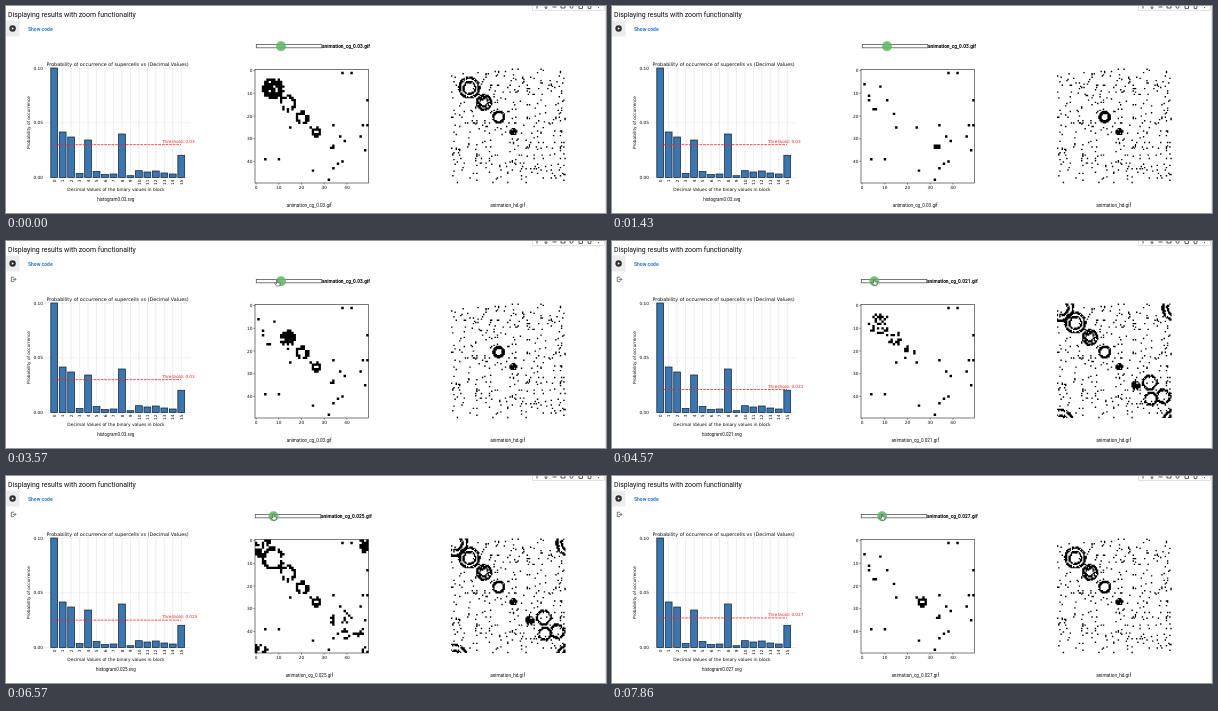
These frames come from a looping animation (600x207 px, 8 s). An HTML page:

```html
<!DOCTYPE html>
<html lang="en">
<head>
<meta charset="utf-8">
<title>Zoom results</title>
<style>
html, body { margin: 0; width: 100%; height: 100%; overflow: hidden; background: #fff; }
svg { display: block; width: 100vw; height: 100vh; }
.ui { font-family: Roboto, Arial, sans-serif; }
.plot { font-family: "DejaVu Sans", Verdana, sans-serif; }
</style>
</head>
<body>
<svg id="stage" viewBox="0 0 600 207"></svg>
<script>
const LOOP = 8000, TICK = 1000 / 7;
const stage = document.getElementById('stage');

function add(tag, attrs, text) {
  const el = document.createElementNS('http://www.w3.org/2000/svg', tag);
  for (const k in attrs) el.setAttribute(k, attrs[k]);
  if (text !== undefined) el.textContent = text;
  stage.appendChild(el);
  return el;
}
const label = (x, y, size, text, more) =>
  add('text', { x, y, 'font-size': size, fill: '#0c0c0c', class: 'ui', ...more }, text);
const plotText = (x, y, size, text, more) => label(x, y, size, text, { class: 'plot', ...more });
const line = (d, stroke, width, more) =>
  add('path', { d, stroke, 'stroke-width': width, fill: 'none', ...more });
const mid = { 'text-anchor': 'middle' };
const end = { 'text-anchor': 'end' };

// Notebook cell
line('M599.6 0V207', '#d8d8d8', 0.8);
label(2, 11, 6.93, 'Displaying results with zoom functionality');
add('rect', { x: 0, y: 14.5, width: 13.5, height: 16, fill: '#ececec' });
add('circle', { cx: 6.6, cy: 22.5, r: 3.2, fill: '#303030' });
add('path', { d: 'M5.8 21.2v2.6l2.2-1.3z', fill: '#fff' });
label(22, 24.8, 5, 'Show code', { fill: '#2f79cf', 'font-weight': 700 });
const outIcon = line('M8 36.2H5.3v4.4H8M6.8 38.4h3M8.4 36.9l1.5 1.5-1.5 1.5', '#444', 0.7);

// Toolbar
add('rect', { x: 526.5, y: -6, width: 72, height: 10.5, fill: '#fff', stroke: '#cfcfcf', 'stroke-width': 0.6 });
line('M531 0v2.6M540 0v2.6l-1.5-1.4M540 2.6l1.5-1.4M546.5 1h4M555 0v2h4V0M573 0v2.4h3.5V0M582 0l.3 2.6h2.4L585 0', '#444', 0.9);
add('circle', { cx: 565.5, cy: 0.7, r: 1.5, fill: 'none', stroke: '#444', 'stroke-width': 0.9 });
add('circle', { cx: 592.5, cy: 1.6, r: 0.6, fill: '#444' });

// Histogram
const BASE = 171.5, yOf = v => BASE - v * 1095;
const tops = [62, 126, 131, 167.5, 134, 165.5, 168.5, 168, 128, 169.7, 164.7, 166, 165, 167, 168, 149.3];
const barX = i => 48.2 + i * 8.47;
plotText(111.5, 59.8, 4.86, 'Probability of occurrence of supercells vs (Decimal Values)', mid);
plotText(0, 0, 4.25, 'Probability of occurrence', { ...mid, transform: 'translate(24.3 116.5) rotate(-90)' });
plotText(110, 184.7, 4.4, 'Decimal Values of the binary values in block', mid);
for (const v of [0, 0.05, 0.1]) {
  line(`M39 ${yOf(v)}H185`, '#c4c4c4', 0.4, { 'stroke-dasharray': '1 .6' });
  plotText(37, yOf(v) + 1.6, 4.3, v.toFixed(2), end);
}
tops.forEach((y, i) => {
  const x = barX(i);
  line(`M${x} 62V${BASE + 1.5}`, '#c0c0c0', 0.45, { 'stroke-dasharray': '1 .6' });
  add('rect', { x: x - 3.4, y, width: 6.8, height: BASE - y, fill: '#3b76b0', stroke: '#14283c', 'stroke-width': 0.75 });
  plotText(0, 0, 4.3, i, { ...end, transform: `translate(${x + 1.6} 173.6) rotate(-90)` });
});
const limit = line('', '#f22', 0.8, { 'stroke-dasharray': '2.6 1' });
const limitText = plotText(156, 0, 4.2, '', { fill: '#f22' });
const histName = label(109.8, 194.6, 4.5, '', mid);

// Plots of cells
const CG = { x: 249, y: 63.5, size: 113.5, n: 50 };
const HD = { x: 445, y: 62.5, size: 114.5, n: 100 };
const coarse = add('path', { fill: '#000' });
const fine = add('path', { fill: '#000' });
add('rect', { x: CG.x, y: CG.y, width: CG.size, height: CG.size, fill: 'none', stroke: '#222', 'stroke-width': 0.6 });
for (let i = 0; i < 50; i += 10) {
  const p = 1.1 + i * 2.27, x = CG.x + p, y = CG.y + p;
  line(`M${x} 177v1.6M${CG.x} ${y}h-1.6`, '#222', 0.5);
  plotText(x, 183, 4.3, i, mid);
  plotText(246.4, y + 1.6, 4.3, i, end);
}
const cgName = label(303.2, 200.9, 4.6, '', mid);
label(501.6, 200.9, 4.7, 'animation_hd.gif', mid);

// Slider
const track = add('rect', { y: 38.4, width: 65.5, height: 3.4, fill: '#fff', stroke: '#555', 'stroke-width': 0.8 });
const knob = add('circle', { cy: 40.2, r: 5, fill: '#62b866', 'fill-opacity': 0.88 });
const pick = label(0, 41.9, 4.8, '', { 'font-weight': 700, fill: '#000' });
const hand = add('path', {
  d: 'M-.6-2.4q.6-.7 1.1 0v2l2 .5q.6.3.4 1.1l-.6 1.9h-3l-1.7-2.4q.2-.8 1-.3l.8.6z',
  fill: '#fff', stroke: '#222', 'stroke-width': 0.5
});

// Cell patterns on a 50 x 50 torus
const hash = (x, y, s) => {
  const h = Math.sin(x * 127.1 + y * 311.7 + s * 74.7) * 43758.5453;
  return h - Math.floor(h);
};
const radii = [0.9, 1.5, 2.3, 3.1, 4.3, 5.4];
const strays = [[34.5, 36, 1.8], [40.5, 34.5, 3], [41, 41.5, 2.6], [46.5, 40.5, 2.8]];
const specks = ('38,1 42,1 1,6 8,7 3,11 3,13 11,13 5,17 6,17 14,19 15,25 24,25 49,13 47,24 49,24 ' +
  '34,24 37,29 46,29 39,31 48,35 36,41 38,40 34,43 4,39 10,39 25,44 32,48').split(' ').map(s => s.split(',').map(Number));

function rings(state) {
  const list = radii.slice(0, state).map((r, i) => {
    const c = 33.6 - i * 6.4;
    return { x: c, y: c + 0.4, r, lead: i + 1 === state };
  });
  if (state > 6) strays.slice(state === 7 ? 2 : 0).forEach(([x, y, r]) => list.push({ x, y, r, loose: true }));
  return list;
}

const coarseHit = (c, d, h, sparse) => {
  if (sparse) return c.r > 2 && d < c.r + 0.5 && h > 0.62;
  if (c.r < 1) return d < 1.25 && (c.lead || h > 0.3);
  if (c.lead && c.r > 2.5) return d < c.r + 0.4 && h > 0.06;
  if (c.loose) return d < c.r && h > 0.68;
  if (c.r > 5) return d < c.r + 0.4 && h > 0.3;
  return Math.abs(d - c.r) < 0.7 && h > 0.08;
};
const fineHit = (c, d, h) => {
  if (c.r < 1) return d < 1 && h > 0.35;
  if (c.r < 2) return d < c.r + 0.15 && h > 0.12;
  if (c.lead && c.r < 3) return d < c.r + 0.4 && d > c.r - 0.95;
  if (Math.abs(d - c.r) < 0.55) return h > (c.loose ? 0.15 : 0.08);
  return c.r > 3 && !c.loose && Math.abs(d - c.r * 0.6) < 0.5 && h > 0.2;
};

const square = (g, x, y, grow) => {
  const s = g.size / g.n, w = (s + grow).toFixed(2);
  return `M${(g.x + x * s).toFixed(2)} ${(g.y + y * s).toFixed(2)}h${w}v${w}h-${w}z`;
};
const gap = (a, b) => {
  const d = Math.abs(a - b);
  return Math.min(d, 50 - d);
};

function draw(g, state, hit) {
  const list = rings(state), u = 50 / g.n;
  let d = '';
  for (let y = 0; y < g.n; y++) for (let x = 0; x < g.n; x++) {
    const on = list.some((c, i) => {
      const dist = Math.hypot(gap((x + 0.5) * u, c.x), gap((y + 0.5) * u, c.y));
      return dist < c.r + 1.3 && hit(c, dist, hash(x, y, i));
    });
    if (on) d += square(g, x, y, 0.06);
  }
  return d;
}

let noise = '';
for (let i = 0; i < 390; i++)
  noise += square(HD, Math.floor(hash(i, 1, 3) * 100), Math.floor(hash(i, 2, 5) * 100), 0.25);

const cache = {};
const once = (key, make) => cache[key] || (cache[key] = make());

function coarsePath(state, v) {
  const sparse = v < 0.0235;
  return once(`cg${state}${sparse}`, () => {
    const shown = state > 4 ? specks.filter(([x, y]) => x + y > 35) : specks;
    return shown.map(([x, y]) => square(CG, x, y, 0.2)).join('') +
      draw(CG, state, (c, d, h) => coarseHit(c, d, h, sparse));
  });
}
const finePath = state => once('hd' + state, () => noise + draw(HD, state, fineHit));

// Value and pointer against time
const part = (t, a, b) => Math.min(1, Math.max(0, (t - a) / (b - a)));
const ease = p => p * p * (3 - 2 * p);
function valueAt(t) {
  const v = 0.03 - 0.01 * ease(part(t, 3700, 4850)) +
    0.005 * ease(part(t, 5500, 6150)) + 0.002 * ease(part(t, 6700, 7250));
  return Math.round(v * 1000) / 1000;
}

function render(time) {
  const t = Math.floor((time + 2) / TICK) * TICK;
  const v = valueAt(t), name = String(v);
  const shift = name.length > 4 ? 1 : 0;
  const knobX = 262 + (v - 0.02) * 1300 - shift;
  const y = yOf(v);

  limit.setAttribute('d', `M48 ${y}H175`);
  limitText.setAttribute('y', y - 1.7);
  limitText.textContent = 'Threshold: ' + name;
  histName.textContent = `histogram${name}.svg`;
  cgName.textContent = pick.textContent = `animation_cg_${name}.gif`;
  track.setAttribute('x', 250.3 - shift);
  pick.setAttribute('x', 316 - shift);
  knob.setAttribute('cx', knobX);

  coarse.setAttribute('d', coarsePath(Math.floor(5.2 + t / 90) % 10, v));
  fine.setAttribute('d', finePath(Math.floor(5.9 + t / 200) % 10));

  const inside = t > 2990;
  const near = ease(part(t, 2990, 3420));
  const grab = part(t, 3560, 3900);
  outIcon.style.display = hand.style.display = inside ? '' : 'none';
  const hx = knobX - 4 + 4 * grab - 9 * (1 - near);
  hand.setAttribute('transform', `translate(${hx} ${42 - grab + 18 * (1 - near)})`);
}

const start = performance.now();
function loop() {
  render((performance.now() - start) % LOOP);
  requestAnimationFrame(loop);
}
loop();
</script>
</body>
</html>
```
